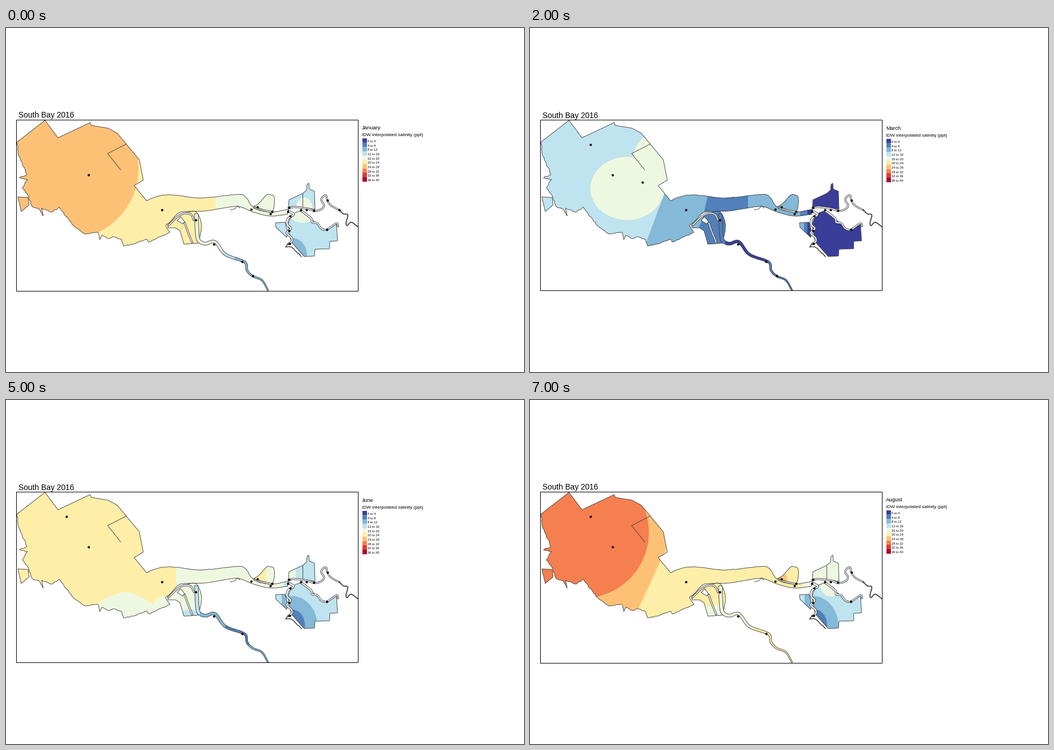
Write a matplotlib script that moves like this. It is 917 px wide and 611 px high and loops after 8000 ms.

```python
import numpy as np
import matplotlib.pyplot as plt
from matplotlib.animation import FuncAnimation
from matplotlib.patches import PathPatch, Polygon, Rectangle
from matplotlib.path import Path

W, H, DPI = 917, 611, 100
PX = 72 / DPI
MONTHS = "January February March April May June July August".split()
JAN, FEB, MAR, APR, MAY, JUN, JUL, AUG = range(8)
# reversed RdYlBu, slightly see-through on white
COLORS = 0.96 * plt.get_cmap("RdYlBu_r")(np.linspace(0, 1, 10))[:, :3] + 0.04
EDGE = "#404040"
rng = np.random.default_rng(16)

plt.rcParams["font.family"] = "Liberation Sans"
fig = plt.figure(figsize=(W / DPI, H / DPI), dpi=DPI, facecolor="white")
ax = fig.add_axes([0, 0, 1, 1])
ax.set(xlim=(0, W), ylim=(H, 0))
ax.axis("off")


# ---------- geometry helpers ----------
def smooth(pts, n=8):
    """Catmull-Rom curve through the points."""
    p = np.array(pts, float)
    p = np.vstack([2 * p[0] - p[1], p, 2 * p[-1] - p[-2]])
    t = np.linspace(0, 1, n, endpoint=False)[:, None]
    out = [0.5 * (2 * b + (c - a) * t + (2 * a - 5 * b + 4 * c - d) * t**2
                  + (3 * b - a - 3 * c + d) * t**3)
           for a, b, c, d in zip(p, p[1:], p[2:], p[3:])]
    return np.vstack(out + [p[-2:-1]])


def rough(pts, amp=0.9, step=3):
    """Ragged shoreline along straight legs."""
    p = np.array(pts, float)
    out = []
    for a, b in zip(p, p[1:]):
        n = max(1, int(np.hypot(*(b - a)) / step))
        leg = a + (b - a) * np.linspace(0, 1, n, endpoint=False)[:, None]
        leg[1:] += rng.uniform(-amp, amp, (n - 1, 2))
        out.append(leg)
    return np.vstack(out + [p[-1:]])


def band(pts, w0, w1):
    """Ribbon around a smooth centre line, tapering from w0 to w1."""
    c = smooth(pts)
    d = np.gradient(c, axis=0)
    normal = np.column_stack([-d[:, 1], d[:, 0]]) / np.hypot(*d.T)[:, None]
    off = normal * np.linspace(w0, w1, len(c))[:, None] / 2
    return np.vstack([c + off, (c - off)[::-1]])


def closed(pts):
    pts = np.asarray(pts, float)
    return Path(np.vstack([pts, pts[:1]]), closed=True)


# ---------- water bodies ----------
north_shore = [(19, 203), (69, 164), (92, 195), (149, 168), (151, 173), (181, 178),
               (197, 187), (236, 234), (243, 270), (227, 280), (249, 307)]
north_bank = [(249, 307), (262, 301), (290, 296), (345, 302), (410, 295.5), (425, 301),
              (439, 320), (468, 327), (500, 322)]
south_bank = [(498, 331), (468, 334), (438, 327), (411, 317), (378, 321), (352, 325),
              (318, 326), (305, 329), (290, 345), (283, 350), (285, 356)]
south_shore = [(285, 356), (290, 363), (252, 380), (249, 375), (225, 384), (208, 387),
               (205, 376), (192, 371), (180, 374), (170, 368), (166, 376), (163, 363),
               (140, 366), (119, 351), (94, 318), (82, 327), (63, 320), (66, 334),
               (58, 321), (46, 317), (40, 299), (29, 284), (38, 269), (24, 266),
               (37, 260), (22, 225), (19, 203)]
island = [(21, 300), (39, 301), (41, 314), (27, 326)]
slough = [(337, 330), (339, 370), (344, 380), (354, 383), (370, 380), (388, 402),
          (417, 413), (425, 419), (427, 431), (437, 441), (453, 448), (464, 466)]

BAY = Path.make_compound_path(
    closed(np.vstack([north_shore, rough(smooth(north_bank, 3), 0.4),
                      smooth(south_bank), rough(south_shore)])),
    closed(island))
MARSH = closed(smooth([(286, 350), (299, 338), (310, 331), (322, 327), (337, 327),
                       (346, 350), (341, 382)]).tolist()
               + [(315, 384), (308, 360), (300, 355), (287, 355)])
SLOUGH = closed(band(slough, 6.5, 2.2))
KNOB = closed(smooth([(438, 317), (447, 312), (461, 297), (467, 296), (475, 301),
                      (472, 325), (457, 323)], 4))
NORTH = closed([(500, 318), (501, 305), (525, 294), (532, 288), (533, 278), (536, 275.5),
                (537, 286), (546, 290), (547, 322), (520, 318)])
SOUTH = closed([(512, 328), (520, 325), (530, 330), (548, 346), (557, 355), (568, 359),
                (585, 348), (587, 378), (573, 379), (573, 392), (547, 393), (546, 405),
                (528, 406), (505, 380), (499, 350), (503, 338)])
WEST = closed([(477, 346), (494, 345), (498, 360), (497, 372), (478, 354)])
BODIES = BAY, MARSH, SLOUGH, KNOB, NORTH, SOUTH, WEST

# ---------- salinity zones ----------
layers = [[] for _ in MONTHS]


def paint(month, body, patch):
    patch.set(lw=0, zorder=3 if body is SLOUGH else 1)
    ax.add_patch(patch)
    patch.set_clip_path(body, ax.transData)
    layers[month].append(patch)


def base(month, *classes):
    for body, k in zip(BODIES, classes):
        paint(month, body, PathPatch(body, fc=COLORS[k]))


def cut(month, body, k, x, slope=0):
    """Class k east of a line that crosses y = 310 at x."""
    edge = [(x + slope * (y - 310), y) for y in (150, 480)]
    paint(month, body, Polygon(edge + [(W, 480), (W, 150)], fc=COLORS[k]))


def blob(month, body, k, cx, cy, rx, ry=None, p=2):
    """Class k inside a superellipse."""
    t = np.linspace(0, 2 * np.pi, 120)
    c, s = np.cos(t), np.sin(t)
    x = cx + rx * np.sign(c) * np.abs(c) ** (2 / p)
    y = cy + (ry or rx) * np.sign(s) * np.abs(s) ** (2 / p)
    paint(month, body, Polygon(np.column_stack([x, y]), fc=COLORS[k]))


base(JAN, 5, 5, 4, 4, 3, 3, 3)
blob(JAN, BAY, 6, 109.5, 250, 125)
cut(JAN, BAY, 4, 371)
blob(JAN, NORTH, 4, 528, 322, 15, 21)
blob(JAN, SOUTH, 4, 525, 328, 24, 18)
blob(JAN, SOUTH, 2, 507, 404, 26, 31)
cut(JAN, SLOUGH, 3, 383)
cut(JAN, SLOUGH, 2, 405)

base(FEB, 5, 4, 4, 3, 3, 2, 2)
blob(FEB, BAY, 4, 198, 228, 48, 89, 1.5)
blob(FEB, BAY, 4, 188, 388, 50, 39, 1.6)
cut(FEB, BAY, 4, 306)
cut(FEB, BAY, 3, 372)
blob(FEB, SOUTH, 3, 535, 325, 28, 26)
for body in (SOUTH, WEST):
    blob(FEB, body, 1, 502, 374, 22, 26)
cut(FEB, SLOUGH, 3, 343)
cut(FEB, SLOUGH, 2, 388)

base(MAR, 3, 2, 1, 2, 0, 0, 2)
blob(MAR, BAY, 4, 172, 285, 65, 56)
blob(MAR, BAY, 4, 225, 245, 45, 60)
cut(MAR, BAY, 2, 232, -0.37)
cut(MAR, BAY, 1, 312, -0.23)
cut(MAR, BAY, 2, 386)
cut(MAR, BAY, 1, 478)
cut(MAR, BAY, 0, 491)
cut(MAR, MARSH, 1, 317, -0.4)
cut(MAR, WEST, 1, 485)
cut(MAR, WEST, 0, 491)
cut(MAR, SLOUGH, 0, 346)
cut(MAR, SLOUGH, 1, 420)

base(APR, 3, 2, 2, 2, 1, 1, 1)
blob(APR, BAY, 4, 75, 220, 112)
cut(APR, BAY, 2, 240, -0.4)
cut(APR, BAY, 3, 388)
cut(APR, BAY, 2, 454)
blob(APR, SOUTH, 0, 502, 390, 28, 44)
cut(APR, SLOUGH, 1, 388)

base(MAY, 4, 3, 2, 3, 3, 2, 2)
blob(MAY, BAY, 3, 359, 389, 200)
blob(MAY, BAY, 4, 370, 381, 143)
cut(MAY, BAY, 3, 308, -0.2)
cut(MAY, BAY, 4, 388)
cut(MAY, BAY, 3, 454)
cut(MAY, BAY, 2, 485)
blob(MAY, BAY, 2, 342, 328, 25, 22)
blob(MAY, BAY, 5, 426, 324, 14)
cut(MAY, MARSH, 2, 313)
cut(MAY, NORTH, 2, 513)
blob(MAY, SOUTH, 1, 485, 405, 61, 75, 1.6)
cut(MAY, WEST, 1, 487)

base(JUN, 5, 4, 3, 5, 4, 3, 3)
blob(JUN, BAY, 4, 210, 390, 70, 49, 1.5)
blob(JUN, BAY, 4, 295, 366, 34, 20)
cut(JUN, BAY, 4, 301)
cut(JUN, BAY, 3, 492)
cut(JUN, KNOB, 4, 461)
blob(JUN, MARSH, 3, 325, 390, 30, 17)
cut(JUN, NORTH, 3, 513)
blob(JUN, SOUTH, 2, 505, 400, 46, 52)
blob(JUN, SOUTH, 1, 506, 400, 23, 28)
cut(JUN, WEST, 2, 488)
cut(JUN, SLOUGH, 2, 343)
cut(JUN, SLOUGH, 1, 388)
cut(JUN, SLOUGH, 2, 430)

base(JUL, 5, 5, 4, 5, 4, 3, 3)
blob(JUL, BAY, 6, 105, 250, 125)
cut(JUL, BAY, 4, 468)
blob(JUL, SOUTH, 2, 503, 401, 46, 53)
blob(JUL, SOUTH, 1, 505, 400, 22, 28)
cut(JUL, WEST, 2, 487)
cut(JUL, SLOUGH, 3, 380)

base(AUG, 6, 5, 4, 5, 4, 3, 3)
blob(AUG, BAY, 7, 93.5, 235, 117)
cut(AUG, BAY, 5, 220, -0.46)
cut(AUG, BAY, 4, 483)
blob(AUG, MARSH, 4, 328, 385, 30, 20)
blob(AUG, KNOB, 6, 447, 318, 8, 10)
blob(AUG, SOUTH, 4, 533, 325, 20, 24)
blob(AUG, SOUTH, 2, 500, 402, 46, 54)
blob(AUG, SOUTH, 1, 504, 400, 22, 28)
cut(AUG, WEST, 2, 486)
cut(AUG, SLOUGH, 5, 396)


# ---------- shorelines, levees and creeks ----------
def line(pts, color=EDGE, lw=0.9):
    ax.plot(*np.array(pts).T, color=color, lw=lw * PX, zorder=4, snap=False)


def hollow(path, fc="white", z=4):
    ax.add_patch(PathPatch(path, fc=fc, ec=EDGE, lw=0.9 * PX, zorder=z, snap=False))


def creek(w0, w1, *pts):
    hollow(closed(band(pts, w0, w1)))


for body in BODIES:
    hollow(body, "none", 3.5 if body is SLOUGH else 2)

line([(213, 206), (180, 223), (203, 252)])
line([(525.5, 294), (525.5, 318)])
line(smooth([(397, 323), (405, 321), (410, 316), (414, 320)]))
creek(2.5, 2.5, (287, 351), (305, 334), (318, 329), (328, 332), (333, 342))
creek(2.5, 2.5, (316, 345), (322, 362), (330, 382))
hollow(closed([(303, 342), (309, 335), (316, 344), (313, 348)]))
creek(2, 2.5, (440, 319), (452, 323), (471, 327))
creek(2.5, 2.2, (499, 320), (511, 318), (534, 321), (546, 325), (558, 322), (563, 315),
      (558, 305), (563, 298), (567, 298), (569, 306), (575, 315), (591, 324))
line(smooth([(590, 323), (597, 330), (605, 332), (602, 346), (604, 351), (611, 345),
             (623, 353)]), lw=1.8)
creek(3, 2.2, (522, 324), (540, 338), (542, 345), (551, 347), (558, 356), (568, 358),
      (585, 347), (588, 353))
creek(3.5, 2.8, (500, 325), (509, 331), (499, 339), (498, 349), (504, 356), (497, 364),
      (505, 372), (506, 379), (499, 384))
line(rough([(501, 383), (495, 389), (505, 389), (523, 406)], 0.8), lw=1.5)
frame = ax.add_patch(Rectangle((18.5, 163.5), 605, 304, fc="none", ec="black", lw=PX,
                               zorder=6, snap=False))

# ---------- stations ----------
stations = [(146, 261), (275.5, 323), (336, 341), (368, 384), (418, 415), (434, 321.5),
            (445, 318), (468, 329.5), (470.5, 326), (499, 325.5), (500.5, 319),
            (502.5, 334), (522, 322.5), (531.5, 323), (545, 323.5), (569, 306),
            (500.5, 360), (502, 383), (568, 358)]
bay_head, creek_end = (106.5, 206.5), (437, 440)
visits = {JAN: [(590, 323)], FEB: [(176, 245.5)], MAR: [(199, 273.5)], MAY: [(221.5, 302.5)]}
dots, = ax.plot([], [], "o", color="black", ms=4.1 * PX, mew=0, zorder=7)

# ---------- title and legend ----------
moving = []


def label(x, y, text, size):
    t = ax.text(x, y, text, fontsize=size * PX, va="baseline", zorder=7)
    moving.append((t, y))
    return t


label(22, 159, "South Bay 2016", 13.8)
month_name = label(630, 180, "", 9.5)
label(630, 192, "IDW interpolated salinity (ppt)", 8.25)
for i, color in enumerate(COLORS):
    y = 195.8 + 7.68 * i
    box = ax.add_patch(Rectangle((631, y), 7.5, 7.68, fc=color, lw=0, zorder=6))
    moving.append((box, y))
    label(640.5, y + 7.2, f"{4 * i} to {4 * i + 4}", 5.8)


def update(m):
    for i, group in enumerate(layers):
        for patch in group:
            patch.set_visible(i == m)
    sites = (stations + visits.get(m, []) + [bay_head] * (m > JAN)
             + [creek_end] * (m < MAY))
    dots.set_data(*np.array(sites).T)
    month_name.set_text(MONTHS[m])
    # month names without a hanging letter or the like shift the layout by a pixel
    shift = int(m in (MAR, JUN))
    frame.set_height(304 - shift)
    for artist, y in moving:
        artist.set_y(y + shift)
    return []


anim = FuncAnimation(fig, update, frames=len(MONTHS), init_func=lambda: [],
                     interval=1000, repeat=True, repeat_delay=0)
plt.show()
```
